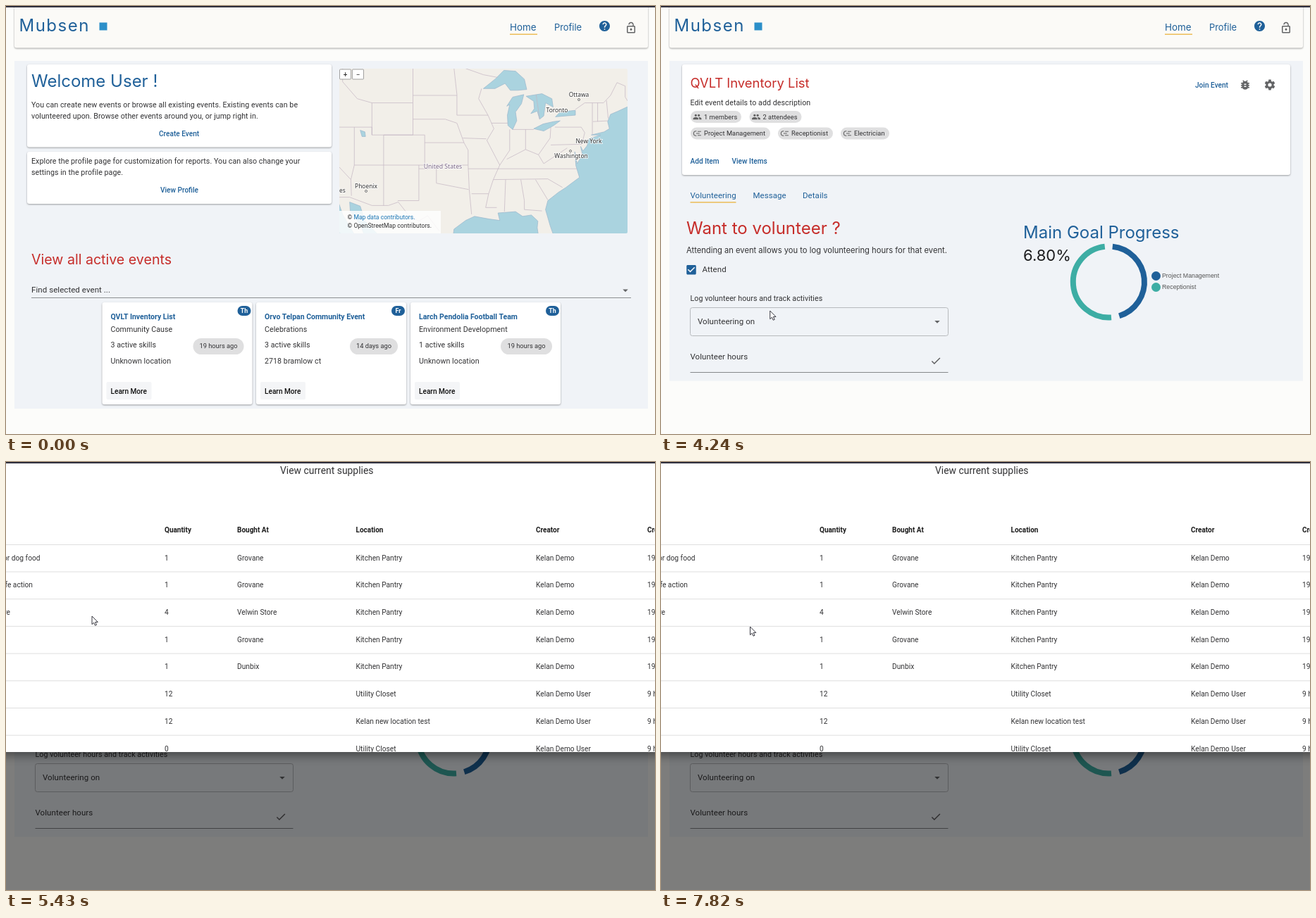
These frames come from a looping animation (921x608 px, 8000 ms). An HTML page:

```html
<!DOCTYPE html>
<html lang="en">
<head>
<meta charset="utf-8">
<title>Volunteer events</title>
<style>
  html, body { margin: 0; width: 100%; height: 100%; overflow: hidden; background: #fcfcfa; }
  svg { display: block; width: 921px; height: 608px; font-family: Roboto, sans-serif; }
  text { white-space: pre; }
  .geo { font-family: Inter, sans-serif; }
  .med { font-weight: 500; }
  .bold { font-weight: 700; }
  .end { text-anchor: end; }
  .mid { text-anchor: middle; }
  .place { font-family: "Noto Sans", sans-serif; text-anchor: middle; paint-order: stroke; stroke: #fff; stroke-opacity: .7; stroke-width: 2px; }
  .legend { font-family: "Liberation Sans", sans-serif; }
  .paper { fill: #fff; filter: drop-shadow(0 1px 1px rgba(0,0,0,.36)); }
  .drawer { fill: #fff; filter: drop-shadow(0 5px 7px rgba(0,0,0,.42)); }
</style>
</head>
<body>
<svg id="stage" viewBox="0 0 921 608" xmlns="http://www.w3.org/2000/svg"></svg>
<script>
const LOOP = 8000;
const BLUE = '#1f6099', RED = '#c62d2a', INK = '#323234', GREY = '#636466', GOLD = '#ecb94c', TEAL = '#3dada4';

const ICON = {
  lock: 'M12 17c1.1 0 2-.9 2-2s-.9-2-2-2-2 .9-2 2 .9 2 2 2zm6-9h-1V6c0-2.76-2.24-5-5-5S7 3.24 7 6h1.9c0-1.71 1.39-3.1 3.1-3.1 1.71 0 3.1 1.39 3.1 3.1v2H6c-1.1 0-2 .9-2 2v10c0 1.1.9 2 2 2h12c1.1 0 2-.9 2-2V10c0-1.1-.9-2-2-2zm0 12H6V10h12v10z',
  help: 'M12 2C6.48 2 2 6.48 2 12s4.48 10 10 10 10-4.48 10-10S17.52 2 12 2zm1 17h-2v-2h2v2zm2.07-7.75l-.9.92C13.45 12.9 13 13.5 13 15h-2v-.5c0-1.1.45-2.1 1.17-2.83l1.24-1.26c.37-.36.59-.86.59-1.41 0-1.1-.9-2-2-2s-2 .9-2 2H8c0-2.21 1.79-4 4-4s4 1.79 4 4c0 .88-.36 1.68-.93 2.25z',
  bug: 'M20 8h-2.81c-.45-.78-1.07-1.45-1.82-1.96L17 4.41 15.59 3l-2.17 2.17C12.96 5.06 12.49 5 12 5c-.49 0-.96.06-1.41.17L8.41 3 7 4.41l1.62 1.63C7.88 6.55 7.26 7.22 6.81 8H4v2h2.09c-.05.33-.09.66-.09 1v1H4v2h2v1c0 .34.04.67.09 1H4v2h2.81c1.04 1.79 2.97 3 5.19 3s4.15-1.21 5.19-3H20v-2h-2.09c.05-.33.09-.66.09-1v-1h2v-2h-2v-1c0-.34-.04-.67-.09-1H20V8zm-6 8h-4v-2h4v2zm0-4h-4v-2h4v2z',
  people: 'M16 11c1.66 0 2.99-1.34 2.99-3S17.66 5 16 5c-1.66 0-3 1.34-3 3s1.34 3 3 3zm-8 0c1.66 0 2.99-1.34 2.99-3S9.66 5 8 5C6.34 5 5 6.34 5 8s1.34 3 3 3zm0 2c-2.33 0-7 1.17-7 3.5V19h14v-2.5c0-2.33-4.67-3.5-7-3.5zm8 0c-.29 0-.62.02-.97.05 1.16.84 1.97 1.97 1.97 3.45V19h6v-2.5c0-2.33-4.67-3.5-7-3.5z',
  skill: 'M10 5H8.5a7 7 0 0 0 0 14H10v-2H8.5a5 5 0 0 1 0-10H10zM13 6h9v2h-9zM13 16h9v2h-9zM9 11h9v2H9z',
  tick: 'M9 16.17L4.83 12l-1.42 1.41L9 19 21 7l-1.41-1.41z',
  box: 'M19 5v14H5V5h14m0-2H5c-1.1 0-2 .9-2 2v14c0 1.1.9 2 2 2h14c1.1 0 2-.9 2-2V5c0-1.1-.9-2-2-2z',
  boxOn: 'M19 3H5c-1.11 0-2 .9-2 2v14c0 1.1.89 2 2 2h14c1.11 0 2-.9 2-2V5c0-1.1-.89-2-2-2zm-9 14l-5-5 1.41-1.41L10 14.17l7.59-7.59L19 8l-9 9z',
  down: 'M7 10l5 5 5-5z'
};

// y is the middle of the capitals
const text = (x, y, s, size, fill = INK, cls = '', extra = '') =>
  `<text x="${x}" y="${y + .36 * size}" font-size="${size}" fill="${fill}" class="${cls}" ${extra}>${s}</text>`;
const body = (x, y, s) => text(x, y, s, 10.65, INK, '', 'letter-spacing=".06"');
const label = (x, y, s, fill = INK) => text(x, y, s, 11.5, fill, '', 'letter-spacing=".06"');
const button = (x, y, s, fill = BLUE) => text(x, y, s, 10.1, fill, 'med');
const rect = (x, y, w, h, fill, r = 0, extra = '') =>
  `<rect x="${x}" y="${y}" width="${w}" height="${h}" rx="${r}" fill="${fill}" ${extra}/>`;
const paper = (x, y, w, h, extra = '') => rect(x, y, w, h, '#fff', 3, `class="paper" ${extra}`);
const icon = (name, x, y, fill = GREY, size = 18) =>
  `<path d="${ICON[name]}" fill="${fill}" transform="translate(${x - size / 2} ${y - size / 2}) scale(${size / 24})"/>`;
const gear = (x, y) => {
  let teeth = '';
  for (let a = 0; a < 360; a += 60) teeth += rect(-1.9, -7.4, 3.8, 4, GREY, .6, `transform="rotate(${a})"`);
  return `<g transform="translate(${x} ${y})">${teeth}<circle r="4.1" fill="none" stroke="${GREY}" stroke-width="3"/></g>`;
};
const chip = (x, y, w, s, name) =>
  rect(x, y - 8.5, w, 17, '#dfdfe0', 8.5) + icon(name, x + 9.5, y, '#616161', 13) +
  text(x + 19, y, s, 9.3, INK, '', 'letter-spacing=".04"');
const group = (id, inner, extra = '') => `<g id="${id}" ${extra}>${inner}</g>`;

// Mercator map: pairs of west longitude and latitude
const project = (lon, lat) => [
  813 + (75.7 - lon) * 8.32,
  557.8 - 476.7 * Math.log(Math.tan(Math.PI / 4 + lat * Math.PI / 360))
].map(v => v.toFixed(1)).join(' ');
const trace = s => s.split('/').map(part => {
  const n = part.trim().split(/\s+/).map(Number);
  let d = '';
  for (let i = 0; i < n.length; i += 2) d += (i ? 'L' : 'M') + project(n[i], n[i + 1]);
  return d;
}).join('');
const water = s => `<path d="${trace(s)}Z" fill="#aad3df" stroke="#9bb6cc" stroke-width=".7" stroke-linejoin="round"/>`;
const border = s => `<path d="${trace(s)}" fill="none" stroke="#c3b5c2" stroke-width=".7"/>`;

function map() {
  const ocean = [
    '65 45 67.5 44.5 69 44 70.3 43.6 70.8 42.7 70.5 41.8 71.4 41.4 73.6 41 72 41 74 40.5 74.3 39.6 75 38.9 75.4 39.5 75.1 38.4 76 37.2 76.4 38.8 76.2 36.9 75.6 35.3 76.6 34.7 77.9 33.9 79.2 33.2 81 32 81.4 30.7 80.6 28.3 80 26.8 80 25 65 25',
    '82.3 25 82.8 28 82.7 29 83.8 29.9 85.3 29.7 86.5 30.4 88 30.3 89.5 30.2 89.2 29.1 91 29.3 93.5 29.7 95 29.1 97 27.8 97.4 25',
    '114.8 31.8 113 31.2 112.2 29 110 27 109 25 111.5 25 113 28.5 114.7 30.5',
    '118 33 117.1 32.5 116.6 31.5 116 30 115 28.5 114 27 114 25 118 25'
  ];
  const lakes = [
    '92 46.7 90 47.8 88.5 48.8 86.5 48.7 85 47.8 84.6 46.6 86.2 46.5 87.4 46.5 88.3 47.3 90 46.7',
    '87.8 42.2 87.9 43.5 87.5 44.8 88 44.6 87 45.7 85.1 46 85.5 44.9 86.5 43.9 86.3 42.8 87 41.7',
    '84.7 45.8 83.4 45.2 83.3 44.3 83.9 43.7 82.8 44 82.4 43 81.7 43.4 81.4 45 80.1 44.5 80.3 45.5 82 46.1',
    '83.4 41.8 81.8 42.4 80 42.7 78.9 42.8 80 42.2 81.7 41.5',
    '79.7 43.3 79 43.8 77.5 44 76.3 44.1 76.3 43.5 78 43.4',
    '113 41.6 112.2 41.4 112.1 40.8 112.7 40.8'
  ];
  const west = border('111 45 104 45 104 41 111 41 111 45 113.5 45.5 116 47.5 116 49/109 41 102 41 102 37 109 37 109 41/117 42 111 42 111 41/114 42 114 37 109 37 109 31.3/103 37 103 32 106.6 32/114 37 114.6 35 114.5 32.7/116.9 37 114.6 35/104 49 104 45/104 45.9 96.5 45.9');
  const middle = border('104 43 98.5 43 96.5 42.5 95.3 40 94.6 39 94.6 37/102 40 95.3 40/102 37 94.6 37 94.4 33.6 94 30/103 36.5 100 36.5 100 34.5 94.5 33.6/97 49 96.5 46 96.5 43.5 91.2 43.5/92.3 46.7 92.8 45.5 91.2 43.5 90.2 41.8 91.4 40.3 89.2 37 90.3 35 91.1 33 91.6 31 89.7 31/95.5 40.6 91.5 40.5/94.6 36.5 75.9 36.5/94 33 91.1 33');
  const east = border('90.6 42.5 87.8 42.5/87.5 41.7 87.5 39 89.2 37/88 37.8 84.8 39.1 82.6 38.4 80.6 40.6 80.5 42/84.8 41.7 84.8 39.1/87 41.7 83.4 41.7/79.8 42 75.3 42 74.7 41.3 75.2 39.8 80.5 39.7/90.3 35 81 35.1 78.5 33.9/88.2 35 88.4 30.4/85.6 35 85 32 85 30.7 82 30.5/83.1 35 81 32.1/82.6 38.4 81.7 37.2 77.7 39.3/73.4 45 73.4 41.1/72.5 45 72.5 42.7/73.3 42.7 70.8 42.8/71 45.3 70.7 43.1');
  const frontier = border('95 49 92 48.3 89.6 48/83 46 82.4 43/76.3 44.2 74.7 45 71.5 45 70.3 45.9 69.2 47.4 67.8 47 67.8 45.7 67 44.8/117 32.5 114.8 32.5 111 31.3 108.2 31.3 106.5 31.8 104.5 29.6 103 29 101.5 29.8 99.5 27.5');
  const city = (x, y, s, dx, dy) =>
    text(x, y, s, 8.4, '#333', 'place') +
    (dx === undefined ? '' : `<circle cx="${dx}" cy="${dy}" r="1.5" fill="#fff" stroke="#555" stroke-width=".8"/>`);
  const zoom = (x, s) => rect(x, 90, 16, 14, '#fff', 1, 'stroke="#8b8b8b" stroke-width=".8"') + text(x + 8, 97, s, 10, '#222', 'mid');
  return `<g clip-path="url(#mapClip)">${rect(473, 89, 409, 234, '#f2efe9')}${west + middle + east}` +
    `${ocean.map(water).join('') + lakes.map(water).join('') + frontier}` +
    city(813, 125.5, 'Ottawa', 813, 133) + city(782, 147.5, 'Toronto') + city(827, 191.5, 'New York') +
    city(802, 213, 'Washington', 801, 206) + city(511, 256, 'Phoenix', 511, 263) + city(474, 262, 'eles') +
    text(620, 228, 'United States', 8.7, '#7a6685', 'place') +
    rect(473, 291, 144, 32, '#fff', 0, 'fill-opacity=".82"') + zoom(473.5, '+') + zoom(491.5, '−') +
    text(484.5, 300, `© <tspan fill="#1b76b5">Map data contributors.</tspan>`, 8.6) +
    text(484.5, 312, '© OpenStreetMap contributors.', 8.6) + '</g>';
}

function eventCard(x, day, title, kind, skills, place, age, w) {
  return paper(x, 421, 213, 145) +
    rect(x + 192, 426, 19, 14, BLUE, 7) + text(x + 201.5, 433, day, 8.8, '#fff', 'bold mid') +
    text(x + 12, 441.5, title, 10.5, BLUE, 'bold') +
    body(x + 12, 459, kind) + body(x + 12, 481, skills) + body(x + 12, 504, place) +
    rect(x + 201 - w, 472, w, 23, '#dfdfe0', 11.5) + text(x + 201 - w / 2, 483, age, 9.3, INK, 'mid') +
    rect(x + 6, 534, 64, 25, '#f4f5f7', 2) + button(x + 12, 547, 'Learn More', '#111');
}

const header = paper(12, -6, 899, 65.5, 'style="fill:#fbfaf7"') +
  text(18.5, 27, 'Mubsen', 24, BLUE, 'geo', 'letter-spacing="1.5"') +
  rect(132.5, 23.5, 11, 11, '#2c8fc9') +
  text(715, 30, 'Home', 13.4, BLUE, 'geo') + rect(715, 39.5, 39, 1.4, GOLD) +
  text(778, 30, 'Profile', 12.9, BLUE, 'geo') +
  icon('help', 849.5, 28.5, BLUE) + icon('lock', 887, 31);

const home = rect(12, 78, 899, 494, '#f0f3f7') +
  paper(30, 83, 432, 117.5) + paper(30, 207, 432, 74) +
  text(36, 106, 'Welcome User !', 24, BLUE, 'geo') +
  body(36, 140, 'You can create new events or browse all existing events. Existing events can be') +
  body(36, 156, 'volunteered upon. Browse other events around you, or jump right in.') +
  button(217, 181, 'Create Event') +
  body(36, 220, 'Explore the profile page for customization for reports. You can also change your') +
  body(36, 236.5, 'settings in the profile page.') +
  button(219, 261, 'View Profile') + map() +
  text(36, 360, 'View all active events', 19.6, RED, 'geo') +
  label(36, 403, 'Find selected event ...') + icon('down', 879, 404) + rect(36, 414, 851, 1, '#8c8f92') +
  eventCard(136.5, 'Th', 'QVLT Inventory List', 'Community Cause', '3 active skills', 'Unknown location', '19 hours ago', 72) +
  eventCard(355, 'Fr', 'Orvo Telpan Community Event', 'Celebrations', '3 active skills', '2718 bramlow ct', '14 days ago', 68) +
  eventCard(574, 'Th', 'Larch Pendolia Football Team', 'Environment Development', '1 active skills', 'Unknown location', '19 hours ago', 73) +
  `<g clip-path="url(#learnClip)">${rect(142, 534, 64, 25, '#000', 2, 'id="learnHover" opacity="0"')}<circle id="learnRipple" cx="173" cy="547" fill="#000" fill-opacity=".22"/></g>`;

const brief = body(41.5, 109, 'Edit event details to add description') +
  chip(42, 138.5, 72, '0 members', 'people') + chip(125.5, 138.5, 74, '0 attendees', 'people');
const full = text(41.5, 109, 'QVLT Inventory List', 18.4, RED, 'geo') +
  body(41.5, 137, 'Edit event details to add description') +
  chip(42, 157.5, 72, '1 members', 'people') + chip(125.5, 157.5, 74, '2 attendees', 'people') +
  chip(42, 181, 113, 'Project Management', 'skill') + chip(166, 181, 78, 'Receptionist', 'skill') + chip(255, 181, 69, 'Electrician', 'skill');

const lower = button(41.5, 183.5, 'Add Item') +
  rect(96, 170.5, 61, 27, BLUE, 3, 'id="viewHover" opacity="0"') +
  `<g clip-path="url(#viewClip)"><circle id="viewRipple" cx="122.5" cy="183.5" fill="${BLUE}" fill-opacity=".28"/></g>` +
  button(100.5, 183.5, 'View Items') +
  label(41.5, 232.5, 'Volunteering', BLUE) + rect(41.5, 241.5, 65, 1.4, GOLD) +
  label(130.5, 232.5, 'Message', BLUE) + label(201, 232.5, 'Details', BLUE) +
  text(36, 278.5, 'Want to volunteer ?', 24, RED, 'geo') +
  text(36, 310.5, 'Attending an event allows you to log volunteering hours for that event.', 11.2, INK, 'geo') +
  group('boxOff', icon('box', 43, 338, BLUE)) + group('boxOn', icon('boxOn', 43, 338, BLUE)) +
  label(58.5, 337.5, 'Attend') +
  text(514, 284.5, 'Main Goal Progress', 24, BLUE, 'geo') +
  text(514, 317.5, '0.00%', 22, '#1d1d1f', 'geo', 'id="percent"');

const extras = body(41.5, 415, 'Log volunteer hours and track activities') +
  rect(41.5, 428.5, 366, 40, 'none', 3, 'stroke="#b7babd"') +
  label(52, 448, 'Volunteering on') + icon('down', 392, 448.5) +
  label(41.5, 497.5, 'Volunteer hours') + icon('tick', 390, 504, '#5c5c5e', 17) + rect(41.5, 520, 366, 1, '#85888b') +
  `<path id="arcA" fill="none" stroke="${BLUE}" stroke-width="8"/><path id="arcB" fill="none" stroke="${TEAL}" stroke-width="8"/>` +
  `<circle cx="702.5" cy="383.5" r="6.5" fill="${BLUE}"/><circle cx="702.5" cy="399.5" r="6.5" fill="${TEAL}"/>` +
  text(711, 383, 'Project Management', 8.8, '#555', 'legend') + text(711, 399, 'Receptionist', 8.8, '#555', 'legend');

const detail = rect(12, 78, 899, 337, '#f0f3f7', 0, 'id="panel"') + paper(30, 83, 863, 120.5, 'id="card"') +
  button(758, 112, 'Join Event') + icon('bug', 829, 112) + gear(864, 112) +
  group('brief', brief) + group('full', full) + group('lower', lower) + group('extras', extras);

function table() {
  const cols = [225, 328, 496.5, 752, 910];
  const user = 'Kelan Demo', pantry = 'Kitchen Pantry', closet = 'Utility Closet';
  const early = (n, shop) => [n, shop, pantry, user, '19 hours ago'];
  const late = (n, place) => [n, '', place, user + ' User', '9 hours ago'];
  const rows = [early(1, 'Grovane'), early(1, 'Grovane'), early(4, 'Velwin Store'), early(1, 'Grovane'), early(1, 'Dunbix'),
    late(12, closet), late(12, 'Kelan new location test'), late(0, closet), late(0, closet)];
  const items = [['for dog food', 48.5], ['safe action', 38], ['store', 6]];
  const step = 38.7;
  let out = text(389, 12, 'View current supplies', 13.9) + rect(0, 117, 921, 1, '#dfdfdf');
  ['Quantity', 'Bought At', 'Location', 'Creator', 'Created'].forEach((s, i) => out += text(cols[i], 96, s, 10, '#1c1c1c', 'bold'));
  items.forEach(([s, x], i) => out += text(x, 136 + i * step, s, 10.2, INK, 'end'));
  rows.forEach((row, r) => {
    row.forEach((s, i) => out += text(cols[i], 136 + r * step, s, 10.2));
    out += rect(0, 155.5 + r * step, 921, 1, '#dfdfdf');
  });
  return out;
}

const clip = (id, x, y, w, h) => `<clipPath id="${id}">${rect(x, y, w, h, '#000', 2)}</clipPath>`;
const stage = document.getElementById('stage');
stage.innerHTML = '<defs>' + clip('mapClip', 473, 89, 409, 234) + clip('learnClip', 142, 534, 64, 25) +
  clip('viewClip', 96, 170.5, 61, 27) + clip('drawerClip', 0, -10, 921, 422) + '</defs>' +
  rect(0, 0, 921, 608, '#fcfcfa') + header + group('home', home) + group('detail', detail) +
  rect(0, 0, 921, 608, '#000', 0, 'id="shade"') +
  group('drawer', rect(-20, -20, 961, 432, '#fff', 0, 'class="drawer"') + `<g clip-path="url(#drawerClip)">${group('table', table())}</g>`) +
  '<path id="cursor" d="M0 0V11.6L2.7 9.2L4.5 13.2L6.5 12.3L4.7 8.4H8.3Z" fill="#fff" stroke="#22222c" stroke-width=".9"/>' +
  rect(0, 0, 921, 2, '#2f2f3d');

const el = {};
stage.querySelectorAll('[id]').forEach(e => el[e.id] = e);
const set = (id, o) => { for (const k in o) el[id].setAttribute(k, o[k]); };
const show = (id, on) => { el[id].style.display = on ? '' : 'none'; };
const span = (t, a, b) => Math.min(1, Math.max(0, (t - a) / (b - a)));
const out = p => 1 - (1 - p) ** 3;
const smooth = p => p * p * (3 - 2 * p);
const mix = (a, b, p) => a + (b - a) * p;

function arc(from, to) {
  const at = a => {
    const r = a * Math.PI / 180;
    return `${(635.5 + 50.5 * Math.sin(r)).toFixed(2)} ${(392 - 50.5 * Math.cos(r)).toFixed(2)}`;
  };
  return `M${at(from)}A50.5 50.5 0 ${to - from > 180 ? 1 : 0} 1 ${at(to)}`;
}

function pointer(t) {
  if (t < 3980) {
    const p = smooth(span(t, 90, 720)), q = 1 - p;
    return [q * q * 846 + 2 * p * q * 470 + p * p * 172, q * q * 612 + 2 * p * q * 452 + p * p * 546];
  }
  if (t < 6830) {
    const p = smooth(span(t, 3980, 4640));
    return [mix(172, 122, p), mix(546, 219, p)];
  }
  const p = smooth(span(t, 7620, 7820));
  return [mix(122, 126.5, p), mix(220, 234, p)];
}

function scroll(t) {
  if (t < 6830) return 0;
  if (t < 6890) return 3.7;
  return mix(3.7, 38.7, out(span(t, 6870, 7300))) * (1 - out(span(t, 7600, 7820)));
}

function drawerEdge(t) {
  return t < 5160 ? 0 : t < 5230 ? 17 : mix(17, 412, out(span(t, 5180, 5430)));
}

function draw(t) {
  const opened = t >= 1700, loaded = t >= 1790, joined = t >= 1930;
  show('home', !opened);
  show('detail', opened);
  set('learnHover', { opacity: .06 * span(t, 640, 720) });
  set('learnRipple', { r: 42 * out(span(t, 1500, 1700)) });

  show('brief', !loaded);
  show('full', loaded);
  show('extras', joined);
  show('boxOff', !joined);
  show('boxOn', joined);
  set('panel', { height: joined ? 454.5 : loaded ? 373.5 : 337 });
  set('card', { height: loaded ? 157 : 120.5 });
  set('lower', { transform: `translate(0 ${loaded ? 36.7 : 0})` });
  el.percent.textContent = joined ? '6.80%' : '0.00%';
  const grow = out(span(t, 2200, 2780));
  set('arcA', { d: arc(6 * grow, 163 * grow) });
  set('arcB', { d: arc(176 * grow, 353.5 * grow) });
  set('viewHover', { opacity: .05 * span(t, 4560, 4640) });
  set('viewRipple', { r: 25 * out(span(t, 4950, 5160)) });

  const edge = drawerEdge(t);
  show('drawer', edge > 0);
  show('table', t >= 5280);
  set('drawer', { transform: `translate(0 ${edge - 412})` });
  set('table', { transform: `translate(0 ${-scroll(t)})` });
  set('shade', { opacity: t < 5160 ? 0 : t < 5230 ? .028 : .5 * smooth(span(t, 5170, 5430)) });

  const [x, y] = pointer(t);
  show('cursor', t >= 130);
  set('cursor', { transform: `translate(${x} ${y})` });
}

const start = performance.now();
function tick() {
  draw((performance.now() - start) % LOOP);
  requestAnimationFrame(tick);
}
draw(0);
requestAnimationFrame(tick);
</script>
</body>
</html>
```
